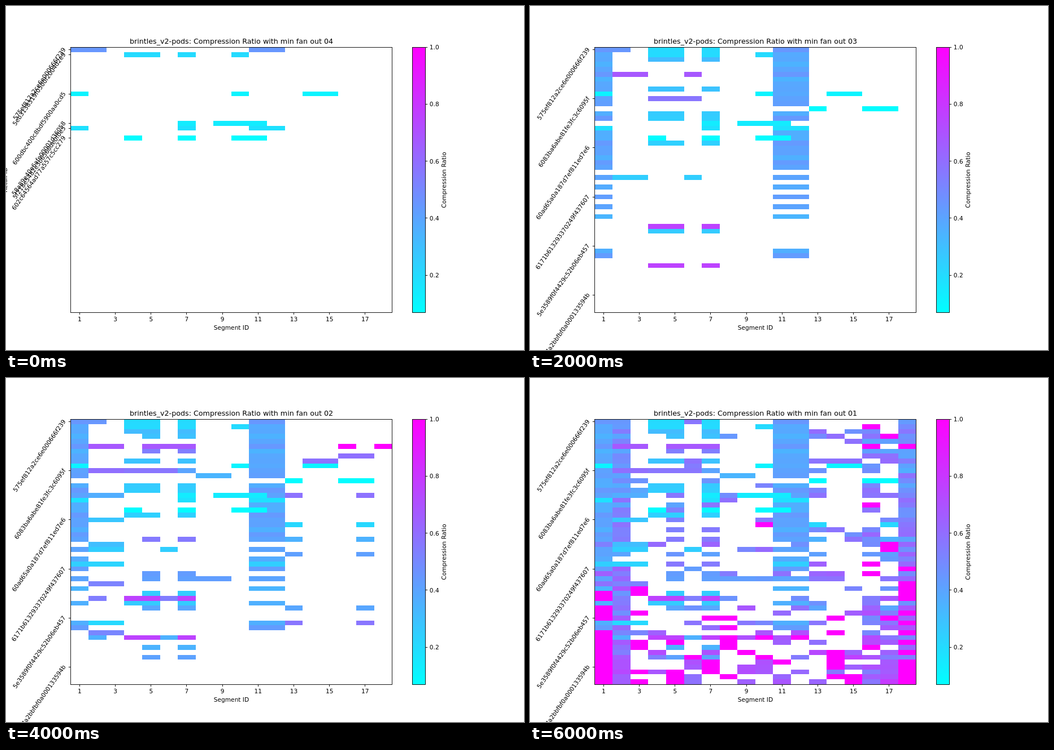
An HTML page that plays this animation: 917x611 px, repeating every 8 s.

```html
<!DOCTYPE html>
<html lang="en">
<head>
<meta charset="utf-8">
<title>Compression ratio heatmap</title>
<style>
  html, body { margin: 0; width: 100%; height: 100%; overflow: hidden; background: #fff; }
  svg { display: block; width: 917px; height: 611px; }
  text { font: 10.6px "DejaVu Sans", sans-serif; fill: #000; }
  #title { font-size: 12.7px; }
  .line { fill: none; stroke: #000; stroke-width: 0.9; }
</style>
</head>
<body>
<svg viewBox="0 0 917 611">
  <defs>
    <linearGradient id="cool" x1="0" y1="0" x2="0" y2="1">
      <stop offset="0" stop-color="#f0f"/>
      <stop offset="1" stop-color="#0ff"/>
    </linearGradient>
  </defs>
  <rect width="917" height="611" fill="#fff"/>
  <g id="cells" shape-rendering="crispEdges"></g>
  <rect class="line" x="114.5" y="73.5" width="569" height="471"/>
  <rect class="line" x="719.5" y="73.5" width="23" height="471" style="fill:url(#cool)"/>
  <g id="axes"></g>
  <g id="rows"></g>
  <text id="title" x="399" y="67" text-anchor="middle"></text>
  <text x="399" y="574.6" text-anchor="middle">Segment ID</text>
  <text transform="translate(779 309) rotate(-90)" text-anchor="middle">Compression Ratio</text>
</svg>
<script>
const STEP = 2000, ROWS = 54, COLS = 18;
const LEFT = 114.6, TOP = 73.3, WIDTH = 568.6, HEIGHT = 470.5, LOW = 0.07;
const colW = WIDTH / COLS, rowH = HEIGHT / ROWS;
const byId = id => document.getElementById(id);
const rowY = r => TOP + (r + 0.5) * rowH;

function seeded(seed) {
  return () => {
    seed = (seed * 16807) % 2147483647;
    return seed / 2147483647;
  };
}

// Fills only empty cells, so each lower fan-out adds to the one before.
function put(grid, row, cols, ratio) {
  for (const c of cols) grid[row * COLS + c - 1] ||= ratio;
}

function fanOut4(grid) {
  put(grid, 0, [1, 2, 11, 12], 0.45);
  put(grid, 1, [4, 5, 7, 10], 0.2);
  put(grid, 9, [1, 10, 14, 15], 0.11);
  put(grid, 15, [7, 9, 10, 11], 0.14);
  put(grid, 16, [1, 7, 11, 12], 0.18);
  put(grid, 18, [4, 7, 10, 11], 0.08);
}

// Segments 1, 11 and 12 are shared by most strains, 4, 5 and 7 by some.
function fanOut3(grid) {
  const rand = seeded(5153);
  put(grid, 5, [2, 3, 6], 0.68);
  put(grid, 10, [4, 5, 6], 0.57);
  put(grid, 12, [13, 16, 17], 0.08);
  put(grid, 26, [2, 3, 6], 0.25);
  for (const r of [0, 2, 8, 13, 14, 19, 36, 37, 44])
    put(grid, r, [4, 5, 7], r % 8 === 4 ? 0.76 : 0.2 + 0.14 * rand());
  for (let r = 0; r < 43; r++) {
    const shared = r < 25 || (r < 35 && r % 2 === 0) || r > 40;
    const ratio = 0.33 + 0.12 * rand();
    if (shared && r !== 12 && r !== 15) put(grid, r, [1, 11, 12], ratio);
  }
}

function fanOut2(grid) {
  const rand = seeded(9377);
  const chances = [
    [[5, 7], 0.24], [[13, 17], 0.12], [[2, 3], 0.14], [[2, 6], 0.08], [[1, 11, 12], 0.2],
    [[14, 15], 0.06], [[16, 17], 0.04], [[8, 9], 0.03]
  ];
  put(grid, 5, [5, 7], 0.68);
  put(grid, 5, [16, 18], 1);
  for (let r = 0; r < 49; r++)
    for (const [cols, chance] of chances) {
      const hit = rand() < chance, ratio = 0.2 + 0.4 * rand();
      if (hit) put(grid, r, cols, ratio);
    }
}

// Single strains: denser and less compressed towards the bottom.
function fanOut1(grid) {
  const rand = seeded(4127);
  const fill = [0.9, 0.85, 0.1, 0, 0.25, 0.08, 0.2, 0.15, 0, 0.04, 0.15, 0.15, 0.12, 0.2, 0.12, 0.4, 0.3, 0.95];
  const heavy = [1, 3, 5, 7, 8, 14, 18];
  for (let r = 0; r < ROWS; r++) {
    const depth = Math.max(0, (r - 20) / (ROWS - 20));
    for (let c = 1; c <= COLS; c++) {
      const hit = rand() < fill[c - 1] + 0.4 * depth;
      const spread = rand(), pick = rand();
      const fullChance = heavy.includes(c) ? depth : 0.12;
      const solid = c === 1 && r > 42;
      const whole = c !== 2 && pick < fullChance;
      if (hit || solid)
        put(grid, r, [c], solid || whole ? 1 : 0.36 + 0.25 * spread + 0.2 * depth);
    }
  }
}

const layers = [fanOut4, fanOut3, fanOut2, fanOut1];

function gridAt(step) {
  const grid = new Array(ROWS * COLS).fill(0);
  layers.slice(0, step + 1).forEach(add => add(grid));
  return grid;
}

function color(v) {
  const t = Math.max(0, (v - LOW) / (1 - LOW));
  const n = Math.round(255 * t);
  return `rgb(${n},${255 - n},255)`;
}

function drawCells(step) {
  return gridAt(step).map((v, i) => {
    if (!v) return "";
    const c = i % COLS, r = Math.floor(i / COLS);
    const x = Math.round(LEFT + c * colW), y = Math.round(TOP + r * rowH);
    const w = Math.round(LEFT + (c + 1) * colW) - x, h = Math.round(TOP + (r + 1) * rowH) - y;
    return `<rect x="${x}" y="${y}" width="${w}" height="${h}" fill="${color(v)}"/>`;
  }).join("");
}

const snap = v => Math.floor(v) + 0.5;
const tick = (x, y, dx, dy) => `<path class="line" d="M${x} ${y}l${dx} ${dy}"/>`;

function drawAxes() {
  let out = "";
  for (let n = 1; n < COLS; n += 2) {
    const x = LEFT + (n - 0.5) * colW;
    out += tick(snap(x), 544.5, 0, 3.7) + `<text x="${x}" y="560" text-anchor="middle">${n}</text>`;
  }
  for (let n = 2; n <= 10; n += 2) {
    const y = TOP + HEIGHT * (1 - n / 10) / (1 - LOW);
    out += tick(742.5, snap(y), 3.7, 0) + `<text x="749.8" y="${y + 4}">${(n / 10).toFixed(1)}</text>`;
  }
  return out;
}

const firstIds = {
  0: "575ef812a2ce6e000666f239", 1: "5eb3138319f0500f2004d2e9", 9: "600dbc400c8bdf5900aa0cd5",
  15: "58a89e40e6afe00001d36058", 16: "5f218e5482e3b6568de0f0e5", 18: "602c64564ad77a557c5cc279"
};
const laterIds = {
  0: "575ef812a2ce6e000666f239", 10: "6083ba6abe81fe3fc3c6095f", 20: "60ad65a0a187d7ef811ed7e6",
  30: "6171b613293370249f437607", 40: "5e3589f0f4429c52b06eb457", 50: "5d1f7a2bbfbf0a000133594b"
};

function drawRows(step) {
  const ids = step ? laterIds : firstIds;
  let out = step ? "" : '<text transform="translate(2 309) rotate(-90)" text-anchor="middle">Retail ID</text>';
  for (const r in ids) {
    const y = rowY(+r);
    out += tick(114.5, snap(y), -3.7, 0) +
      `<text transform="translate(106.2 ${y - 0.4}) rotate(-55)" text-anchor="end">${ids[r]}</text>`;
  }
  return out;
}

let shown = -1;
function render(time) {
  const step = Math.floor(time / STEP) % layers.length;
  if (step === shown) return;
  shown = step;
  byId("cells").innerHTML = drawCells(step);
  byId("rows").innerHTML = drawRows(step);
  byId("title").textContent = `brintles_v2-pods: Compression Ratio with min fan out 0${4 - step}`;
}

byId("axes").innerHTML = drawAxes();
const start = performance.now();
function loop() {
  render(performance.now() - start);
  requestAnimationFrame(loop);
}
loop();
</script>
</body>
</html>
```
